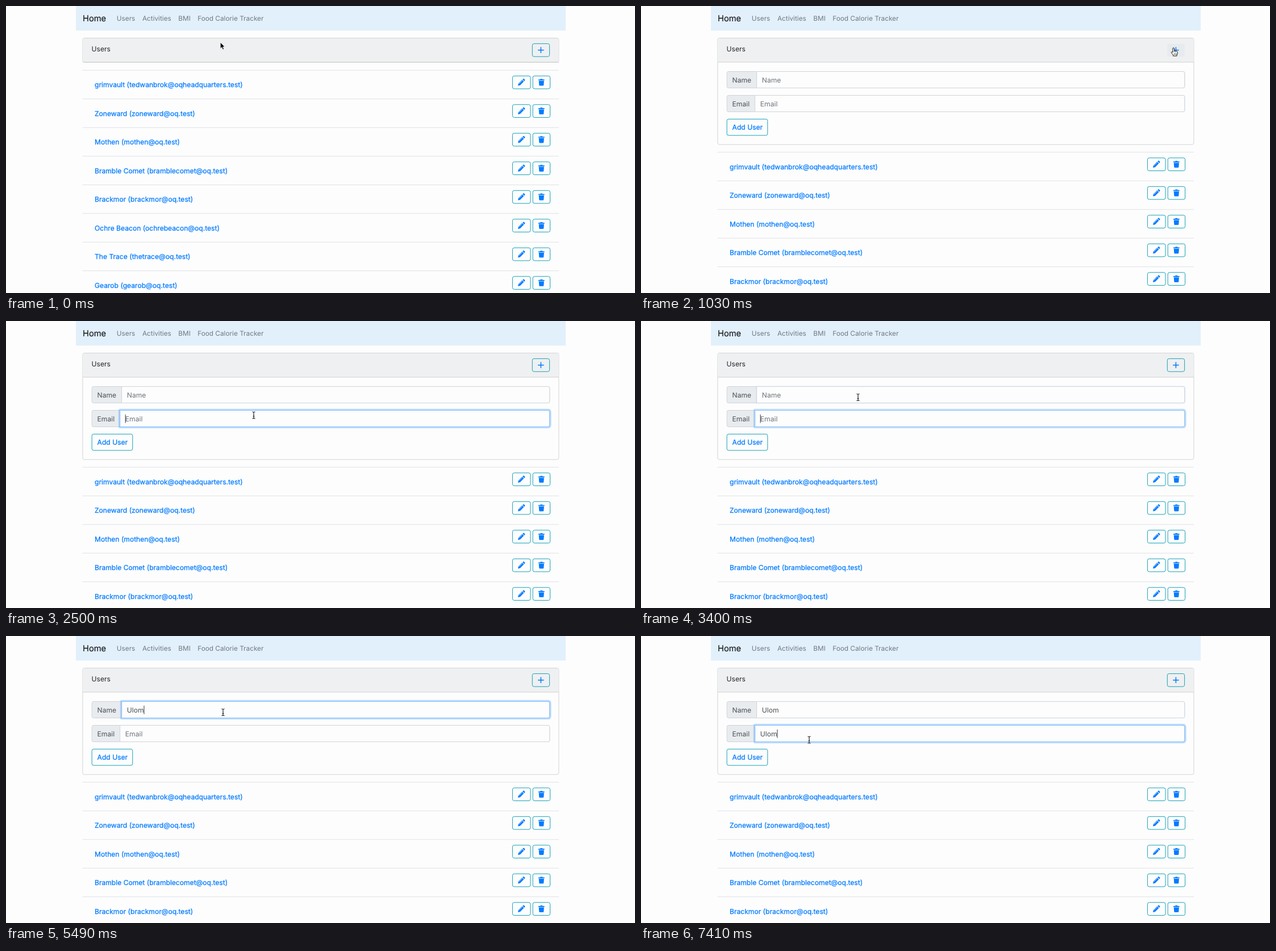
These frames come from a looping animation (1107 px wide and 506 px high, 8 s). An HTML page:

```html
<!DOCTYPE html>
<html lang="en">
<head>
<meta charset="utf-8">
<title>Users</title>
<style>
  html, body { margin: 0; width: 100%; height: 100%; overflow: hidden; background: #fdfdfd; }
  svg { display: block; width: 1107px; height: 506px; }
  text { font: 12.1px Inter, "Open Sans", sans-serif; text-rendering: geometricPrecision; white-space: pre; }
  .nav { font-size: 11.8px; fill: #717982; }
  .brand { font-size: 14.7px; fill: #15181b; stroke: #15181b; stroke-width: .15; }
  .dark { fill: #212529; }
  .label { fill: #495057; }
  .hint { fill: #6c757d; }
  .link, .icon { fill: #007bff; }
  .link { stroke: #007bff; stroke-width: .25; }
  .btn { fill: #fdfdfd; stroke: #17a2b8; }
  .field { fill: #fdfdfd; }
  .line { stroke: #dee2e6; }
</style>
</head>
<body>
<svg id="stage" viewBox="0 0 1107 506"></svg>
<script>
const LOOP = 8000, STEP = 148;
const TOP = 113, PITCH = 50.5, SHIFT = 144.5;
const OPEN_AT = 7;
const TYPED = 'Ulom';

const users = [
  ['grimvault', 'tedwanbrok@oqheadquarters.test'],
  ['Zoneward'], ['Mothen'], ['Bramble Comet'], ['Brackmor'],
  ['Ochre Beacon'], ['The Trace'], ['Gearob']
];

const stage = document.getElementById('stage');

function add(parent, tag, attrs, content) {
  const el = document.createElementNS('http://www.w3.org/2000/svg', tag);
  for (const key in attrs) el.setAttribute(key, attrs[key]);
  if (content) el.textContent = content;
  parent.append(el);
  return el;
}
const group = parent => add(parent, 'g', {});
const label = (parent, x, y, cls, content) => add(parent, 'text', { x, y, class: cls }, content);
const box = (parent, x, y, width, height, attrs) =>
  add(parent, 'rect', { x, y, width, height, ...attrs });
const path = (parent, d, attrs) => add(parent, 'path', { d, ...attrs });
const show = (el, on) => el.setAttribute('display', on ? 'inline' : 'none');

// Navigation bar
box(stage, 123, 0, 862, 43.3, { fill: '#e2f0fc' });
label(stage, 135, 27.3, 'brand', 'Home');
[[194.8, 'Users'], [239.9, 'Activities'], [303.3, 'BMI'], [337.2, 'Food Calorie Tracker']]
  .forEach(([x, name]) => label(stage, x, 26.3, 'nav', name));

// Card with its header
const card = box(stage, 134.9, 56.5, 838, 43, { rx: 3, fill: '#fdfdfd', stroke: '#d3d4d5' });
path(stage, 'M135.4 99V59.5q0-2.5 2.5-2.5H970q2.5 0 2.5 2.5V99z', { fill: '#eff0f1' });
path(stage, 'M135 99H973', { stroke: '#cfd0d1' });
label(stage, 150.6, 80.2, 'dark', 'Users');
const plus = box(stage, 926.3, 66.4, 30.3, 22.8, { rx: 3 });
path(stage, 'M941.4 73v9.4M936.7 77.7h9.4', { stroke: '#007bff', 'stroke-width': 1.5, 'stroke-linecap': 'round' });

// Form
const form = group(stage);
function field(y, name, split) {
  box(form, 151.2, y, 805.6, 29, { rx: 3, fill: '#e9ecef', stroke: '#ced4da' });
  label(form, 160.6, y + 19, 'label', name);
  const shape = `M${split} ${y}H953.8q3 0 3 3v23q0 3-3 3H${split}z`;
  const ring = path(form, shape, { fill: 'none', stroke: '#007bff', 'stroke-width': 5.6, 'stroke-linejoin': 'round' });
  path(form, shape, { class: 'field', stroke: '#ced4da' });
  const edge = path(form, shape, { fill: 'none', stroke: '#80bdff' });
  const x = split + 9.2;
  const hint = label(form, x, y + 19, 'hint', name);
  const value = label(form, x, y + 19, 'label');
  const caret = path(form, `M0 ${y + 7.3}v15`, { stroke: '#343a40', 'stroke-width': 1 });
  return (focus, text, caretOn) => {
    ring.setAttribute('stroke-opacity', focus * 0.25);
    edge.setAttribute('stroke-opacity', focus);
    show(hint, !text);
    value.textContent = text;
    const end = text ? value.getComputedTextLength() : 0;
    caret.setAttribute('transform', `translate(${x + end + 0.4})`);
    show(caret, caretOn);
  };
}
const setName = field(115.5, 'Name', 203.6);
const setEmail = field(157.5, 'Email', 200.6);
box(form, 151.2, 199.4, 71.6, 28.7, { rx: 3, class: 'btn' });
label(form, 160.6, 218.4, 'link', 'Add User');

// List of users
const list = group(stage);
users.forEach(([name, mail], i) => {
  const y = TOP + i * PITCH;
  const address = mail || name.toLowerCase().replace(' ', '') + '@oq.test';
  path(list, `M134.5 ${y + 0.3}H973`, { class: 'line' });
  label(list, 156, y + 30.2, 'link', `${name} (${address})`);
  box(list, 891.4, y + 10.3, 31.6, 22.7, { rx: 3, class: 'btn' });
  box(list, 927.2, y + 10.3, 30.4, 22.7, { rx: 3, class: 'btn' });
  const icons = add(list, 'g', { class: 'icon', transform: `translate(0 ${y + 21.5})` });
  path(icons, 'M901 6l.8-3.8 6.6-6.6 3 3-6.6 6.6zM909.2-5.1l.9-.9q.9-.8 1.8 0l1.2 1.2q.8.9 0 1.8l-.9.9z');
  path(icons, 'M902.8 2.6l5.9-5.9', { stroke: '#fdfdfd', 'stroke-width': 0.7 });
  path(icons, 'M937-4.9h3l.7-1.1h3.2l.7 1.1h3v1.6H937zM937.7-2.5h9.2l-.6 7.4q-.1 1.1-1.2 1.1h-5.6q-1.1 0-1.2-1.1z');
});

// Pointers, drawn around their hot spots
const pointers = { arrow: group(stage), hand: group(stage), beam: group(stage) };
path(pointers.arrow, 'M.2 0V11.2L2.8 8.8 4.6 13l2-.8L4.8 8.1H8.2z', { stroke: '#fff', 'stroke-width': 0.8 });
path(pointers.hand,
  'M-1.6 8V1Q-1.5-.3-.3-.3T1 1V5q1.1-.7 2 .5 1.2-.5 1.9.5 1.7-.3 1.7 1.5V9.5q0 1.6-1.1 2.8V14H-1V12.5L-4 8.5q-.7-1.2.3-1.6T-1.6 8z',
  { fill: '#fff', stroke: '#111', 'stroke-width': 1, 'stroke-linejoin': 'round' });
path(pointers.hand, 'M1 5v2.4M3 5.8v2M.8 9.5v2.6M2.6 9.5v2.6M4.4 9.5v2.6', { stroke: '#111', 'stroke-width': 0.7 });
const beam = 'M-2.6-6Q-.3-6 0-4.8 .3-6 2.6-6M0-5V5M-2.6 6Q-.3 6 0 4.8 .3 6 2.6 6M-1.4 2H1.4';
[['#fff', 2.4], ['#111', 1.1]].forEach(([stroke, width]) =>
  path(pointers.beam, beam, { fill: 'none', stroke, 'stroke-width': width }));

// Pointer stops: step, x, y
const route = [
  [0, 377, 64], [5, 937.5, 74], [8, 937.5, 74], [14, 436, 166], [17, 436, 166],
  [20, 382, 134.5], [38, 382, 134.5], [42, 296, 183], [55, 296, 183]
];
function pointerAt(n) {
  const i = route.findIndex(stop => stop[0] > n);
  const [n0, x0, y0] = route[i - 1], [n1, x1, y1] = route[i];
  const u = (n - n0) / (n1 - n0), e = u * u * (3 - 2 * u);
  return [x0 + (x1 - x0) * e, y0 + (y1 - y0) * e];
}
function pointerKind(x, y, open) {
  if (x > 926 && y > 66 && y < 90) return 'hand';
  const inField = x > 200 && (y > 115 && y < 145 || y > 157 && y < 187);
  return open && inField ? 'beam' : 'arrow';
}

// Latest value of a list of [step, value]
const latest = (changes, n) => changes.reduce((v, [at, next]) => n >= at ? next : v, changes[0][1]);
const emailFocus = [[0, 0], [16, 0.5], [17, 1], [23, 0.9], [24, 0.2], [25, 0], [44, 0.6], [45, 1]];
const nameFocus = [[0, 0], [23, 0.08], [24, 0.8], [25, 1], [44, 0.25], [45, 0]];
const nameLength = [[0, 0], [27, 1], [30, 2], [31, 3], [34, 2], [35, 3], [37, 4]];

function draw(t) {
  const n = Math.floor(t / STEP + 0.15);
  const open = n >= OPEN_AT;
  const [x, y] = pointerAt(n);
  const kind = pointerKind(x, y, open);

  card.setAttribute('height', open ? 187.7 : 43);
  show(form, open);
  list.setAttribute('transform', `translate(0 ${open ? SHIFT : 0})`);
  plus.setAttribute('fill', kind === 'hand' ? '#e8ebee' : '#eff0f1');
  plus.setAttribute('stroke', n >= 5 && n < 16 ? 'none' : '#17a2b8');

  setName(latest(nameFocus, n), TYPED.slice(0, latest(nameLength, n)), n >= 24 && n < 39);
  setEmail(latest(emailFocus, n), TYPED.slice(0, Math.max(0, n - 46)), n >= 17 && n < 24 || n >= 44);

  for (const key in pointers) show(pointers[key], key === kind);
  pointers[kind].setAttribute('transform', `translate(${x} ${y})`);
}

const start = performance.now();
function tick() {
  draw((performance.now() - start) % LOOP);
  requestAnimationFrame(tick);
}
tick();
</script>
</body>
</html>
```
